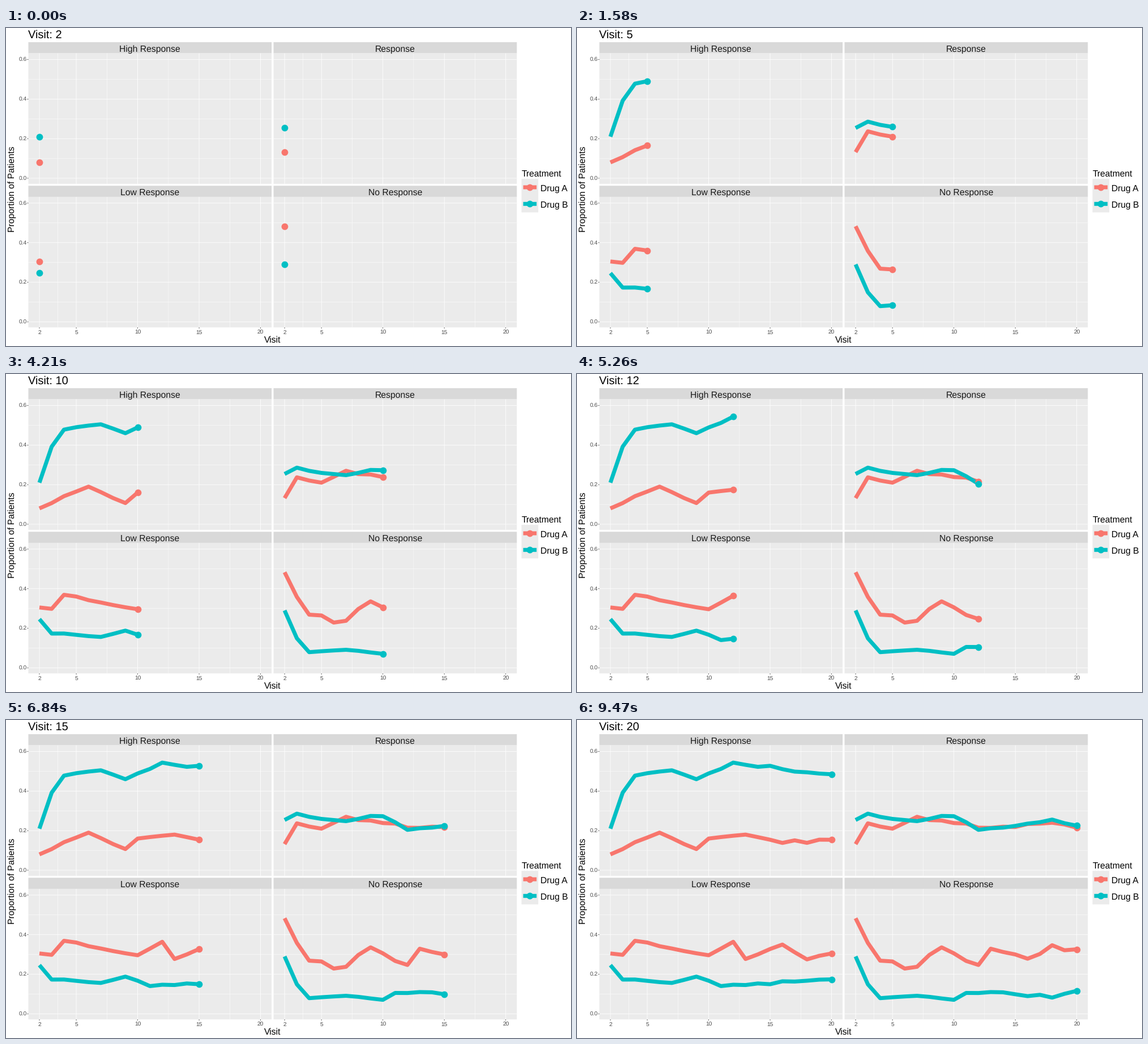
These frames come from a looping animation (998 by 561 pixels, 10000 ms). A matplotlib script:

```python
import matplotlib.pyplot as plt
import numpy as np
from matplotlib.animation import FuncAnimation
from matplotlib.patches import Rectangle

W, H, DPI = 998, 561, 100
LOOP_MS, FRAMES = 10000, 200
PT = 72 / DPI  # points per pixel

plt.rcParams["font.family"] = "Liberation Sans"
plt.rcParams["text.hinting"] = "none"

COLORS = {"Drug A": "#F8766D", "Drug B": "#00BFC4"}
PANEL, STRIP = "#EBEBEB", "#D9D9D9"
VISITS = np.arange(2, 21)
FACETS = ["High Response", "Response", "Low Response", "No Response"]

# Turning points (visit: share); "No Response" is the remainder to 1.
TURNS = {
    "Drug A": [
        {2: .08, 6: .19, 9: .107, 10: .16, 13: .18, 16: .138, 20: .154},
        {2: .132, 3: .237, 5: .21, 7: .27, 13: .214, 18: .24, 20: .215},
        {2: .305, 3: .298, 4: .369, 10: .296, 12: .364, 13: .277,
         16: .35, 18: .275, 20: .305},
    ],
    "Drug B": [
        {2: .21, 3: .392, 4: .478, 7: .505, 9: .46, 12: .544, 18: .495, 20: .485},
        {2: .254, 3: .286, 7: .248, 10: .273, 12: .204, 18: .256, 20: .225},
        {2: .246, 3: .173, 7: .156, 9: .188, 11: .14, 20: .174},
    ],
}

# Panel geometry in pixels
LEFT, WIDTH, COL_STEP = 39.5, 429.7, 433.1
STRIP_TOP, PANEL_TOP, PANEL_END, ROW_STEP = 25.0, 44.6, 274.9, 253.3

fig = plt.figure(figsize=(W / DPI, H / DPI), dpi=DPI, facecolor="white")
ax = fig.add_axes([0, 0, 1, 1])
ax.set_xlim(0, W)
ax.set_ylim(H, 0)
ax.axis("off")
rng = np.random.default_rng(4)


def x_px(visit, col):
    return 59 + 21.7 * (np.asarray(visit) - 2) + COL_STEP * col


def y_px(share, row):
    return 265 - 349 * np.asarray(share) + ROW_STEP * row


def shares(turns):
    """Join the turning points, with a slight wobble in between."""
    wobble = rng.normal(0, 0.004, len(VISITS))
    wobble[np.isin(VISITS, list(turns))] = 0
    return np.interp(VISITS, list(turns), list(turns.values())) + wobble


def box(x0, y0, x1, y1, color):
    ax.add_patch(Rectangle((x0, y0), x1 - x0, y1 - y0, fc=color, lw=0,
                           zorder=1, snap=False))


def v_rules(xs, y0, y1, width, color="white"):
    ax.vlines(xs, y0, y1, colors=color, lw=width * PT, zorder=2, snap=False)


def h_rules(ys, x0, x1, width, color="white"):
    ax.hlines(ys, x0, x1, colors=color, lw=width * PT, zorder=2, snap=False)


def label(x, y, text, size, color="black", ha="center", **kw):
    return ax.text(x, y, text, fontsize=size * PT, color=color, ha=ha,
                   va="baseline", zorder=6, **kw)


def trace(color, order):
    return ax.plot([], [], color=color, lw=7 * PT, zorder=3 + order,
                   solid_capstyle="butt", solid_joinstyle="round",
                   snap=False)[0]


def dot(color, order):
    return ax.plot([], [], "o", color=color, ms=11.8 * PT, mew=0,
                   zorder=4 + order, snap=False)[0]


def draw_panel(col, row, name):
    x0, dy = LEFT + COL_STEP * col, ROW_STEP * row
    x1, top, end = x0 + WIDTH, PANEL_TOP + dy, PANEL_END + dy
    box(x0, STRIP_TOP + dy, x1, top, STRIP)
    box(x0, top, x1, end, PANEL)
    label((x0 + x1) / 2, 41.2 + dy, name, 15.7, "#1A1A1A")

    visits, levels = [2, 5, 10, 15, 20], np.arange(4) / 5
    v_rules(x_px([3.5, 7.5, 12.5, 17.5], col), top, end, 0.5)
    h_rules(y_px(levels[:3] + 0.1, row), x0, x1, 0.5)
    xs, ys = x_px(visits, col), y_px(levels, row)
    v_rules(xs, top, end, 0.8)
    h_rules(ys, x0, x1, 0.8)
    if col == 0:
        h_rules(ys, x0 - 2, x0, 0.8, "#333333")
        for y, s in zip(ys, levels):
            label(36.8, y + 3.8, f"{s:.1f}", 10.3, "#4D4D4D", "right")
    if row == 1:
        v_rules(xs, end, end + 2, 0.8, "#333333")
        for x, v in zip(xs, visits):
            label(x, 539.7, str(v), 10.3, "#4D4D4D")


def draw_legend():
    label(910.7, 262, "Treatment", 15.6, ha="left")
    box(910.6, 266.2, 940.2, 325.3, PANEL)
    for i, (drug, color) in enumerate(COLORS.items()):
        y = 281 + 29.3 * i
        trace(color, 0).set_data([913.6, 937.2], [y, y])
        dot(color, 0).set_data([925.4], [y])
        label(943.7, y + 6.2, drug, 15.6, ha="left")


for k, name in enumerate(FACETS):
    draw_panel(k % 2, k // 2, name)
draw_legend()
label(471, 555.3, "Visit", 15.7)
label(14.8, 284.7, "Proportion of Patients", 15.7, rotation=90,
      rotation_mode="anchor")
title = label(39.5, 18.2, "", 20, ha="left")

series = []
for order, (drug, color) in enumerate(COLORS.items()):
    known = [shares(turns) for turns in TURNS[drug]]
    for k, values in enumerate(known + [1 - sum(known)]):
        series.append((x_px(VISITS, k % 2), y_px(values, k // 2),
                       trace(color, order / 10), dot(color, order / 10)))


def update(frame):
    # A new visit shows from the frame in which its turn begins.
    i = ((frame + 1) * len(VISITS) - 1) // FRAMES
    title.set_text(f"Visit: {VISITS[i]}")
    for xs, ys, line, head in series:
        n = i + 1 if i else 0
        line.set_data(xs[:n], ys[:n])
        head.set_data(xs[i:i + 1], ys[i:i + 1])
    return [title]


anim = FuncAnimation(fig, update, frames=FRAMES, interval=LOOP_MS / FRAMES,
                     repeat=True, repeat_delay=0, blit=False)
plt.show()
```
